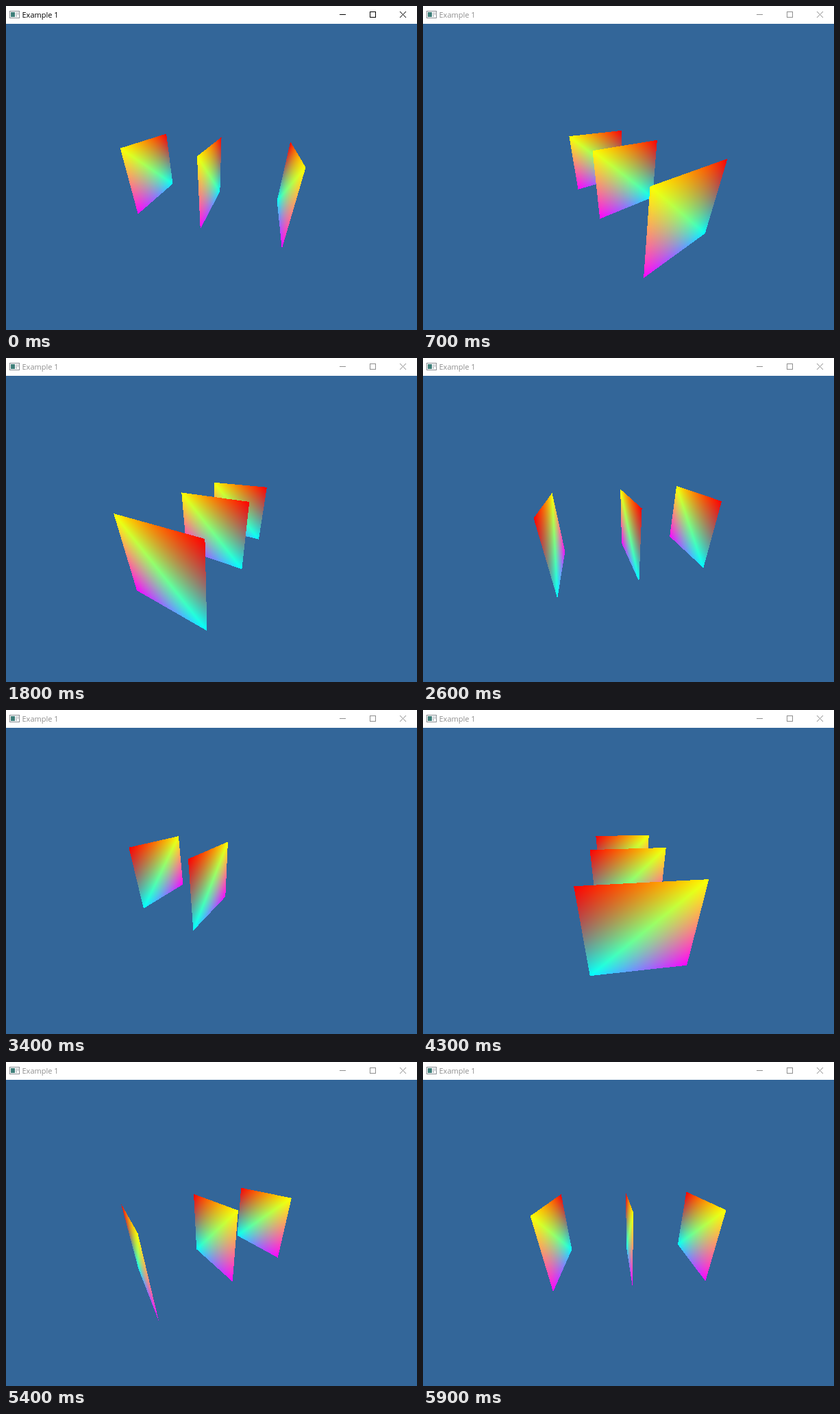
An HTML page with a canvas for the animation above (6000 ms loop, 600x473 px).

```html
<!DOCTYPE html>
<html lang="en">
<head>
<meta charset="utf-8">
<title>Example 1</title>
<style>
  html, body { margin: 0; width: 100%; height: 100%; overflow: hidden; background: #369; }
  svg, canvas { position: absolute; left: 0; display: block; }
  svg { top: 0; color: #000; }
  svg.idle { color: #8f8f8f; }
  canvas { top: 26px; }
  text { font: 11px "Open Sans", "Noto Sans", sans-serif; fill: currentColor; }
  .buttons { fill: none; stroke: currentColor; }
</style>
</head>
<body>
<svg id="bar" width="600" height="26">
  <rect width="600" height="26" fill="#fff"/>
  <g shape-rendering="crispEdges">
    <rect x="5.5" y="7.5" width="14" height="10" fill="#fff" stroke="#8a8f94"/>
    <rect x="7" y="9" width="6" height="7" fill="#3f7f7a"/>
    <rect x="14" y="9" width="2" height="7" fill="#c8ccd0"/>
    <rect x="17" y="9" width="1" height="4" fill="#a8adb2"/>
  </g>
  <text x="23.5" y="17">Example 1</text>
  <g class="buttons">
    <path d="M487 12.5h9M531.5 8.5h8v8h-8z" shape-rendering="crispEdges"/>
    <path d="M575 8l9 9M584 8l-9 9"/>
  </g>
</svg>
<canvas id="view" width="600" height="447"></canvas>
<script>
const LOOP = 6000, STEP = 100, IDLE_AT = 300;
const FOCAL = 225, CX = 300.5, CY = 226.5;   // 90 degree lens
const ROOT5 = Math.sqrt(5);                  // eye at (0, 1, 2), looking at the origin
const BOX = { x: 130, y: 140, w: 340, h: 250 };

// About one radian per second, as [ms, degrees]
const TURN = [[0, 72.3], [700, 33.8], [1800, -28.9], [3400, -120],
              [4300, -173.5], [4900, -207.2], [5900, -264.6]];

const bar = document.getElementById('bar');
const ctx = document.getElementById('view').getContext('2d');
const image = ctx.createImageData(BOX.w, BOX.h);
ctx.fillStyle = '#369';
ctx.fillRect(0, 0, 600, 447);

function angleAt(ms) {
  let i = 1;
  while (i < TURN.length - 1 && ms > TURN[i][0]) i++;
  const [t0, a0] = TURN[i - 1], [t1, a1] = TURN[i];
  return (a0 + (a1 - a0) * (ms - t0) / (t1 - t0)) * Math.PI / 180;
}

// Casts one ray per pixel at three unit squares on the planes z = -1, 0, 1
function draw(angle) {
  const s = Math.sin(angle), c = Math.cos(angle);
  const eyeX = -2 * s, eyeZ = 2 * c;
  const px = image.data;
  let o = 0;
  for (let j = 0; j < BOX.h; j++) {
    const up = CY - (BOX.y + j + 0.5);
    const dirY = (2 * up - FOCAL) / ROOT5;
    const depth = (-up - 2 * FOCAL) / ROOT5;
    for (let i = 0; i < BOX.w; i++, o += 4) {
      const side = BOX.x + i + 0.5 - CX;
      const dirX = side * c - depth * s;
      const dirZ = side * s + depth * c;
      let near = Infinity, r = 0.2, g = 0.4, b = 0.6;
      for (let z = -1; z <= 1; z++) {
        const t = (z - eyeZ) / dirZ;
        if (!(t > 0 && t < near)) continue;
        const u = eyeX + t * dirX + 0.5, v = 1.5 + t * dirY;
        if (u < 0 || u > 1 || v < 0 || v > 1) continue;
        near = t;
        r = Math.max(v, 1 - u);
        g = 1 - Math.abs(u + v - 1);
        b = 1 - v;
      }
      px[o] = r * 255;
      px[o + 1] = g * 255;
      px[o + 2] = b * 255;
      px[o + 3] = 255;
    }
  }
  ctx.putImageData(image, BOX.x, BOX.y);
}

let last = -1;
function tick() {
  const ms = Math.floor(performance.now() % LOOP / STEP) * STEP;
  if (ms !== last) {
    last = ms;
    bar.classList.toggle('idle', ms >= IDLE_AT);
    draw(angleAt(ms));
  }
  requestAnimationFrame(tick);
}
tick();
</script>
</body>
</html>
```
